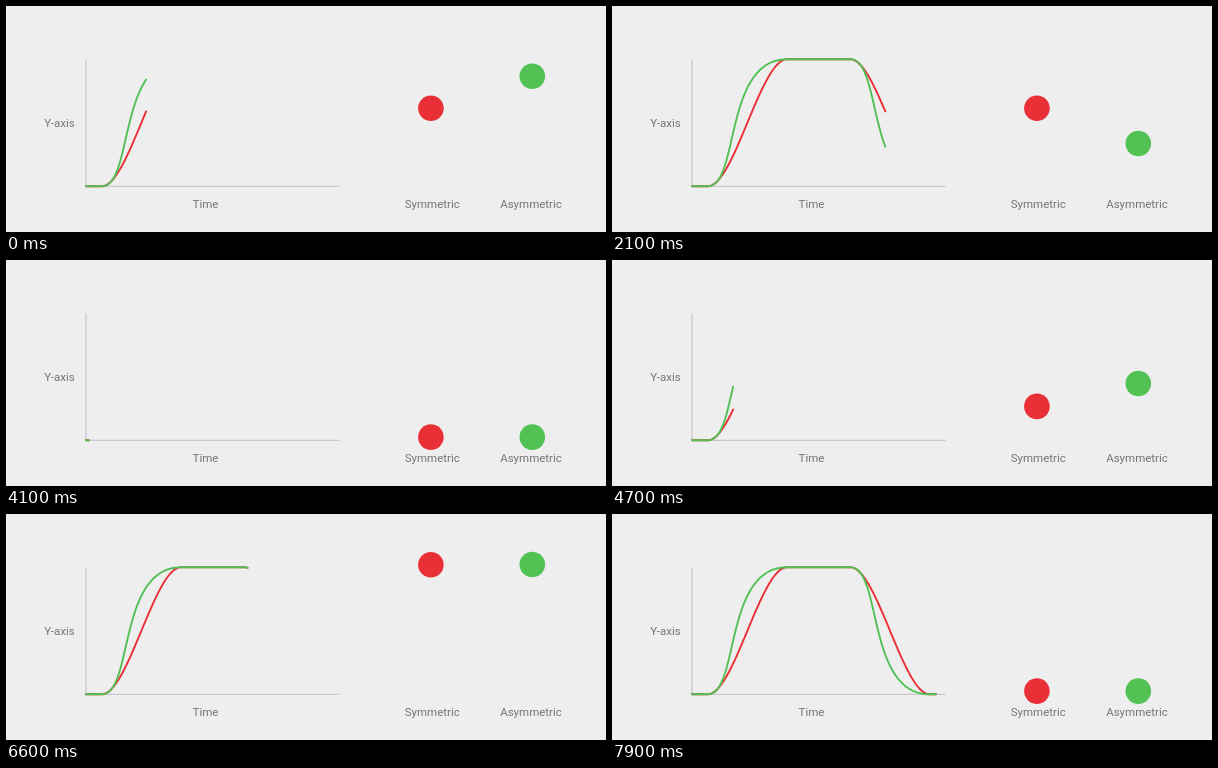
Write an HTML page that moves like this. It is 600 by 226 pixels and loops after 8.4 s.

```html
<!DOCTYPE html>
<html lang="en">
<head>
<meta charset="utf-8">
<title>Symmetric and asymmetric easing</title>
<style>
  html, body { margin: 0; width: 100%; height: 100%; overflow: hidden; background: #eeeeef; }
  svg { display: block; width: 600px; height: 226px; }
  text { font: 11.5px Roboto, sans-serif; fill: #757576; text-anchor: middle; }
  path { fill: none; stroke-width: 1.9; stroke-linecap: round; stroke-linejoin: round; }
  .axes { stroke: #c9c9cb; stroke-width: 1.3; stroke-linecap: butt; stroke-linejoin: miter; }
</style>
</head>
<body>
<svg viewBox="0 0 600 226">
  <path class="axes" d="M79.9 53.3V180.3H333.5"/>
  <g id="curves">
    <path id="redLine" stroke="#e93037"/>
    <path id="greenLine" stroke="#52c054"/>
  </g>
  <circle id="redDot" cx="424.9" r="12.8" fill="#e93037"/>
  <circle id="greenDot" cx="526.3" r="12.8" fill="#53c255"/>
  <text x="53.4" y="121">Y-axis</text>
  <text x="199.5" y="202.2">Time</text>
  <text x="426.2" y="202.2">Symmetric</text>
  <text x="525" y="202.2">Asymmetric</text>
</svg>
<script>
const LOOP = 8400, HOLD_FROM = 7900, STEP = 100;
const CYCLE = 5, OFFSET = 0.95;            // seconds
const DRAW = 4, FADE = 1 / 3, MOVE = 1.25, RISE = 0.25, FALL = 2.5;
const LEFT = 79.9, BASE = 180.3, HEIGHT = 127, SPEED = 63.4;
const DOT_LIFT = 3.2;

const $ = id => document.getElementById(id);
const clamp = v => Math.min(1, Math.max(0, v));

const symmetric = p => p * p * (3 - 2 * p);

// cubic-bezier(.4, 0, .2, 1), solved by bisection
function asymmetric(p) {
  let lo = 0, hi = 1;
  for (let i = 0; i < 24; i++) {
    const u = (lo + hi) / 2, v = 1 - u;
    if (1.2 * v * v * u + 0.6 * v * u * u + u ** 3 < p) lo = u;
    else hi = u;
  }
  return symmetric(lo);
}

const level = (ease, s) =>
  ease(clamp((s - RISE) / MOVE)) - ease(clamp((s - FALL) / MOVE));
const yAt = (ease, s) => BASE - HEIGHT * level(ease, s);

function trace(ease, end) {
  const points = [];
  const add = s => points.push((LEFT + SPEED * s).toFixed(2) + " " + yAt(ease, s).toFixed(2));
  for (let s = 0; s < end; s += 0.02) add(s);
  add(end);
  return "M" + points.join("L");
}

function draw(ms) {
  const t = Math.min(HOLD_FROM, Math.floor(ms % LOOP / STEP) * STEP);
  const s = (t / 1000 + OFFSET) % CYCLE;
  for (const [name, ease] of [["red", symmetric], ["green", asymmetric]]) {
    $(name + "Line").setAttribute("d", trace(ease, Math.min(s, DRAW)));
    $(name + "Dot").setAttribute("cy", yAt(ease, s) - DOT_LIFT);
  }
  $("curves").setAttribute("opacity", 1 - clamp((s - DRAW) / FADE));
}

let start;
function tick(now) {
  start ??= now;
  draw(now - start);
  requestAnimationFrame(tick);
}
draw(0);
requestAnimationFrame(tick);
</script>
</body>
</html>
```
